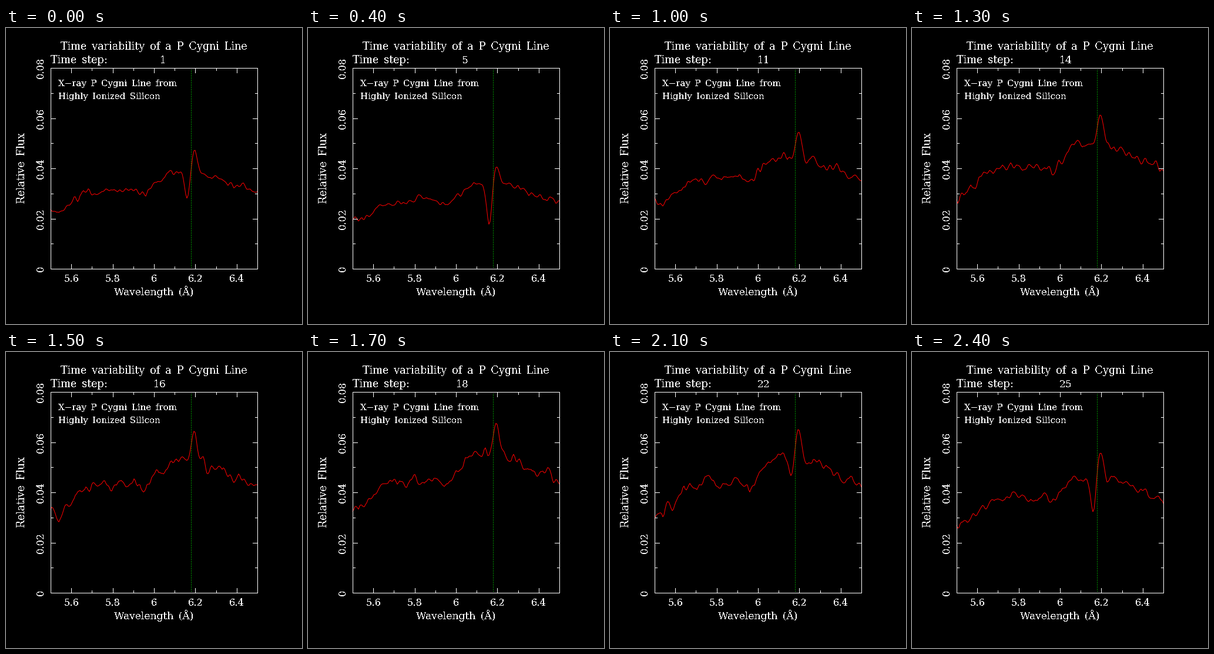
Recreate the animation shown at these times as a matplotlib script. Size 504x504 px, loop 3400 ms.

```python
import numpy as np
import matplotlib.pyplot as plt
from matplotlib.animation import FuncAnimation

SIZE, DPI = 504, 72
LEFT, RIGHT, TOP, BOTTOM = 76, 428, 68, 410
STEPS, FRAMES, INTERVAL = 25, 34, 100
EN_SPACE = "\u2002"

plt.rcParams.update({
    "font.family": "DejaVu Serif",
    "text.antialiased": False,
    "text.color": "white",
})


def px(wavelength):
    return LEFT + (wavelength - 5.5) * (RIGHT - LEFT)


def py(flux):
    return BOTTOM - flux / 0.08 * (BOTTOM - TOP)


def bell(x, center, width):
    return np.exp(-0.5 * ((x - center) / width) ** 2)


WAVE = np.linspace(5.5, 6.5, 177)
CONTINUUM = np.interp(
    WAVE,
    [5.5, 5.54, 5.64, 5.86, 5.96, 6.06, 6.15, 6.28, 6.4, 6.5],
    [0.70, 0.66, 0.90, 0.96, 0.91, 1.14, 1.17, 1.12, 1.00, 0.93])
EMISSION = 0.27 * bell(WAVE, 6.196, 0.0145)
ABSORPTION = bell(WAVE, 6.161, 0.012)


def spectrum(step):
    """Continuum with a variable P Cygni profile and smoothed noise."""
    level = np.interp(step, [1, 5, 9, 14, 20, 25],
                      [0.0332, 0.029, 0.035, 0.043, 0.0502, 0.0398])
    depth = np.interp(step, [1, 5, 9, 20, 25], [0.33, 0.58, 0.05, 0, 0.36])
    rng = np.random.default_rng(step)
    kernel = np.array([1, 2, 2, 1]) / np.sqrt(10)
    noise = np.convolve(rng.normal(size=WAVE.size + 3), kernel, "valid")
    noise *= 0.027 * (1 - 0.8 * bell(WAVE, 6.18, 0.025))
    return level * (CONTINUUM + EMISSION - depth * ABSORPTION + noise)


fig = plt.figure(figsize=(SIZE / DPI, SIZE / DPI), dpi=DPI, facecolor="black")
ax = fig.add_axes([0, 0, 1, 1])
ax.set_xlim(0, SIZE)
ax.set_ylim(SIZE, 0)
ax.axis("off")


def line(xs, ys, color="white", **style):
    return ax.plot(xs, ys, color=color, lw=1, **style)[0]


def label(x, y, text, size=17.6, ha="center", **style):
    return ax.text(x, y, text.replace(" ", EN_SPACE), fontsize=size, ha=ha,
                   va="baseline", rotation_mode="anchor", **style)


curve = line(px(WAVE), py(spectrum(1)), "red")
line([px(6.18)] * 2, [TOP, BOTTOM], "#00ff00", linestyle=(0.5, (1, 2)))
line([LEFT, RIGHT, RIGHT, LEFT, LEFT], [TOP, TOP, BOTTOM, BOTTOM, TOP])

for i in range(1, 10):
    x, length = px(5.5 + i / 10), 8 if i % 2 else 4
    line([x, x], [TOP, TOP + length])
    line([x, x], [BOTTOM, BOTTOM - length])
for i in range(1, 8):
    y, length = py(i / 100), 4 if i % 2 else 8
    line([LEFT, LEFT + length], [y, y])
    line([RIGHT, RIGHT - length], [y, y])

for value in (5.6, 5.8, 6, 6.2, 6.4):
    label(px(value), 432, f"{value:g}", 16.2)
for value in (0, 0.02, 0.04, 0.06, 0.08):
    label(64, py(value), f"{value:g}", 16.2, rotation=90)

label(252, 37, "Time variability of a P Cygni Line")
label(76, 60, "Time step:", ha="left")
label(89, 99, "X\u2212ray P Cygni Line from", 15, ha="left")
label(89, 121, "Highly Ionized Silicon", 15, ha="left")
label(252, 455, "Wavelength (\u00c5)", 17)
label(32, 239, "Relative Flux", rotation=90)
counter = label(273, 60, "1", 17, ha="right")


def draw(frame):
    step = min(frame + 1, STEPS)
    curve.set_ydata(py(spectrum(step)))
    counter.set_text(str(step))
    return curve, counter


anim = FuncAnimation(fig, draw, frames=FRAMES, interval=INTERVAL,
                     repeat=True, repeat_delay=0)
plt.show()
```
